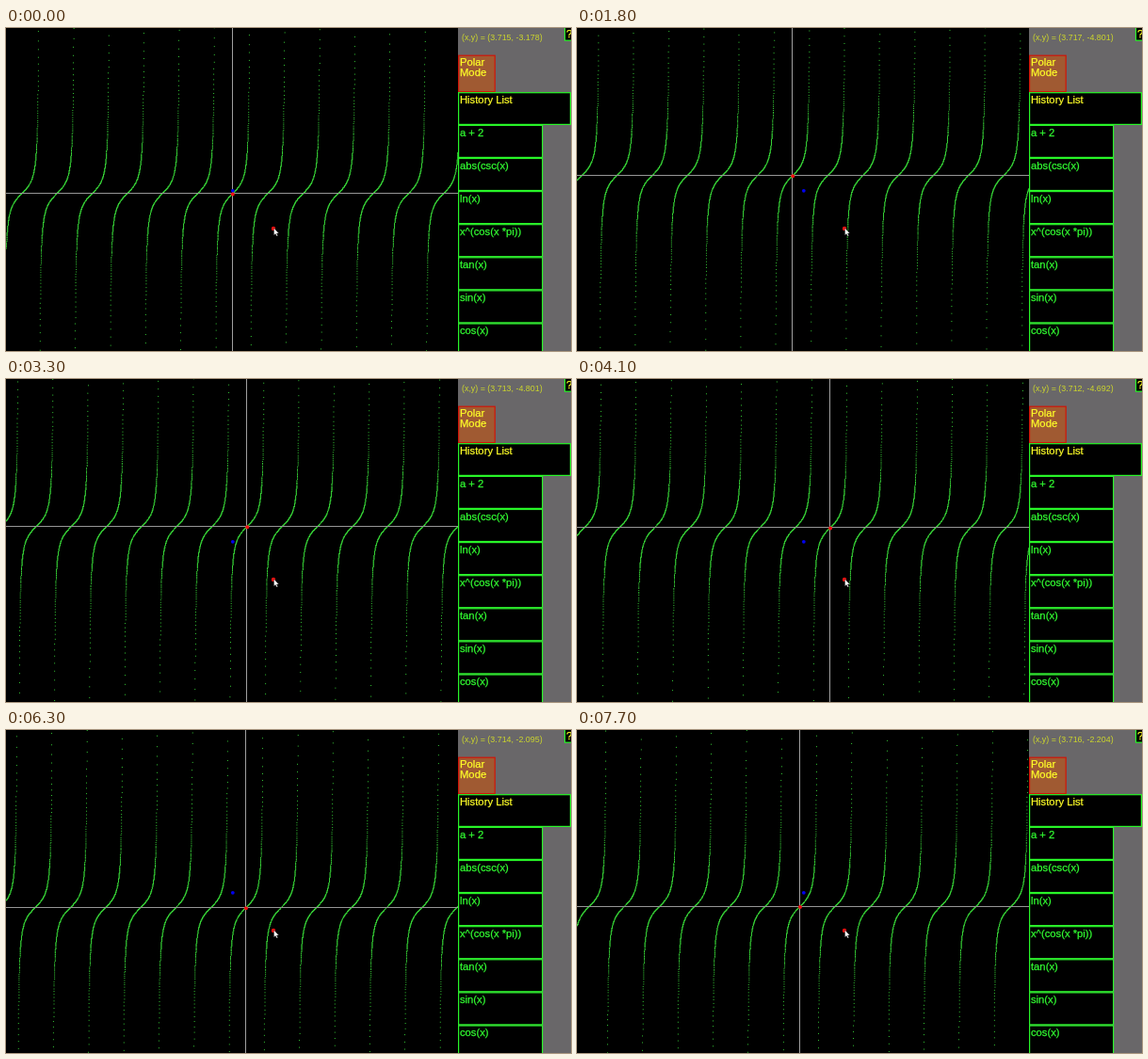
An HTML page with a canvas for the animation above (7800 ms loop, 600x343 px).

```html
<!DOCTYPE html>
<html lang="en">
<head>
<meta charset="utf-8">
<title>Graph panning</title>
<style>
  html, body { margin: 0; width: 100%; height: 100%; overflow: hidden; background: #000; }
  canvas, svg { position: absolute; left: 0; top: 0; width: 600px; height: 343px; }
  text { font: 11.25px "Liberation Sans", Arial, sans-serif; fill: #ffff28; stroke: #ffff28; stroke-width: .25; }
  .item text { fill: #32ff32; stroke: #32ff32; }
  .box { fill: #000; stroke: #28f528; stroke-width: 1.2; }
  #pos { font-size: 8.9px; fill: #ccd62c; stroke: none; }
</style>
</head>
<body>
<canvas id="plot" width="600" height="343"></canvas>
<svg viewBox="0 0 600 343">
  <rect id="axisX" width="480" height="1" fill="#969696"/>
  <rect id="axisY" width="1" height="343" fill="#a0a0a0"/>
  <circle cx="240.8" cy="172.8" r="1.9" fill="#00e"/>
  <circle id="origin" r="2" fill="#f01010"/>
  <circle cx="284" cy="213" r="2.2" fill="#f01010"/>
  <path d="M284.5 212.4v7.6l1.7-1.5 1.2 2.6 1.2-.6-1.1-2.5h2.2z" fill="#fff" stroke="#000" stroke-width=".3"/>
  <rect x="480" width="120" height="343" fill="#696769"/>
  <text id="pos" x="484" y="12.7"></text>
  <rect class="box" x="593.5" y="-1" width="8" height="14.2"/>
  <text x="595" y="10.2">?</text>
  <rect x="480.6" y="29.2" width="38.6" height="38.4" fill="#a05a32" stroke="#d01408" stroke-width="1.2"/>
  <text x="482" y="40">Polar</text>
  <text x="482" y="50.6">Mode</text>
  <rect class="box" x="480.6" y="68.7" width="118.8" height="33.7"/>
  <text x="482" y="80">History List</text>
  <g id="list"></g>
</svg>
<script>
const $ = id => document.getElementById(id);
const ctx = $('plot').getContext('2d');
const UNIT = 11.88, STEP = 0.10821, TICK = 100, TICKS = 78;
const HOME = { x: 240.2, y: 175.5 };
const CELL = 0.64, DOT = 0.9, DX = 0.052;

$('list').innerHTML = ['a + 2', 'abs(csc(x)', 'ln(x)', 'x^(cos(x *pi))', 'tan(x)', 'sin(x)', 'cos(x)']
  .map((s, i) => `<g class="item" transform="translate(480.6 ${(103.4 + 35.1 * i).toFixed(1)})">
    <rect class="box" width="89" height="34"/><text x="1.4" y="11.2">${s}</text></g>`).join('');

// tick, pan steps to the right, pan steps up
const keys = [
  [0, 0, 0], [8, 0, 15], [9, 0, 15], [18, -9, 15], [28, 5, 15], [40, 22, 15],
  [41, 22, 14], [42, 22, 14], [51, 22, -7], [54, 22, -10], [55, 21, -10],
  [58, 21, -10], [63, 11, -10], [76, -3, -10], [77, -3, -9]
];

function panAt(tick) {
  const n = Math.max(1, keys.findIndex(k => k[0] >= tick));
  const a = keys[n - 1], b = keys[n];
  const p = (tick - a[0]) / (b[0] - a[0]);
  return [1, 2].map(i => Math.round(a[i] + (b[i] - a[i]) * p));
}

function drawCurve(ox, oy) {
  ctx.clearRect(0, 0, 600, 343);
  ctx.fillStyle = '#41f541';
  let lastX, lastY;
  for (let x = 0; x < 480; x += DX) {
    const y = oy - UNIT * Math.tan((x - ox) / UNIT);
    if (y < -1 || y > 344) continue;
    const cx = Math.round(x / CELL), cy = Math.round(y / CELL);
    if (cx === lastX && cy === lastY) continue;
    ctx.fillRect(cx * CELL, cy * CELL, DOT, DOT);
    lastX = cx;
    lastY = cy;
  }
}

function render(tick) {
  const [right, up] = panAt(tick);
  const ox = HOME.x + right * STEP * UNIT;
  const oy = HOME.y - up * STEP * UNIT;
  drawCurve(ox, oy);
  $('axisX').setAttribute('y', Math.floor(oy));
  $('axisY').setAttribute('x', Math.floor(ox));
  $('origin').setAttribute('cx', ox + 0.6);
  $('origin').setAttribute('cy', oy + 1);
  const px = (3.7154 - right * 0.00016).toFixed(3);
  const py = (-3.17752 - up * STEP).toFixed(3);
  $('pos').textContent = `(x,y) = (${px}, ${py})`;
}

const start = performance.now();
let shown = -1;
function loop() {
  const tick = Math.floor((performance.now() - start) / TICK) % TICKS;
  if (tick !== shown) render(shown = tick);
  requestAnimationFrame(loop);
}
loop();
</script>
</body>
</html>
```
